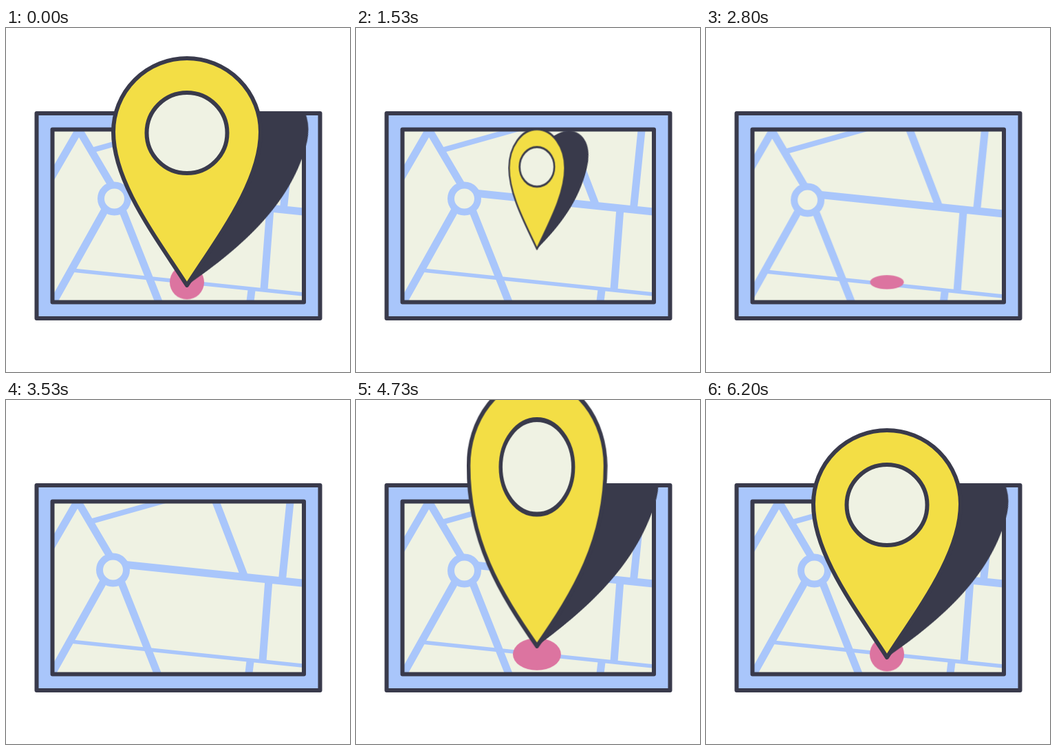
An HTML page that plays this animation: 500x500 px, repeating every 6.23 s.

```html
<!DOCTYPE html>
<html lang="en">
<head>
<meta charset="utf-8">
<title>Map pin</title>
<style>
  html, body { margin: 0; width: 100%; height: 100%; overflow: hidden; background: #fff; }
  svg { display: block; width: 100vw; height: 100vh; }

  .paper { fill: #eff2e3; }
  .line { stroke: #393a4b; stroke-width: 6; stroke-linejoin: round; }
  .roads { fill: none; stroke: #a9c6fb; stroke-width: 11; }

  /* three identical hops fill one 6230 ms loop */
  #map, #dot, #shadow, #body, #hole {
    animation: 2076.667ms ease-in-out infinite;
    transform-origin: 0 0;
  }
  #map { animation-name: pan; }
  #dot { animation-name: dot; }
  #shadow { animation-name: shadow; }
  #body {
    --slim: path("M0 0C45 -70 107 -150 107 -223A107 107 0 0 0 -107 -223C-107 -150 -45 -70 0 0Z");
    --full: path("M0 0C58 -66 107 -130 107 -223A107 107 0 0 0 -107 -223C-107 -130 -58 -66 0 0Z");
    animation-name: body, bulge;
  }
  #hole { animation-name: hole; }

  @keyframes pan {
    0%, 28.4% { transform: translate(0, 0); animation-timing-function: ease-in; }
    34.82% { transform: translate(-9.5px, 2px); animation-timing-function: cubic-bezier(.3, .5, .6, 1); }
    42.4% { transform: translate(-36px, 2px); }
    56.68% { transform: translate(12.5px, -34px); }
    69.97% { transform: translate(-2px, -1px); }
    73.6%, 100% { transform: translate(0, 0); }
  }

  @keyframes dot {
    0%, 15.65% { transform: scale(1, 1); }
    27.78% { transform: scale(1.4, .94); animation-timing-function: linear; }
    34.82% { transform: scale(1, .42); animation-timing-function: linear; }
    38%, 75.5% { transform: scale(0, 0); }
    82% { transform: scale(1.2, 1.05); }
    89% { transform: scale(.95, .97); }
    96%, 100% { transform: scale(1, 1); }
  }

  @keyframes bulge {
    0%, 15.65%, 34.3%, 76.71%, 92.45%, 100% { d: var(--slim); }
    27.78%, 80.9% { d: var(--full); }
  }

  @keyframes body {
    0%, 15.65% { transform: translateY(0) scale(1, 1); }
    21.67% { transform: translateY(0) scale(1.07, .88); }
    27.78% { transform: translateY(-16px) scale(.935, 1.18); animation-timing-function: linear; }
    31.8% { transform: translateY(-50px) scale(.42, .7); animation-timing-function: linear; }
    34.3%, 70.06% { transform: translateY(-75px) scale(0, 0); animation-timing-function: linear; }
    73.68% { transform: translateY(-53px) scale(.374, .523); animation-timing-function: linear; }
    76.71% { transform: translateY(-40px) scale(.7, .85); animation-timing-function: ease-out; }
    80.9% { transform: translateY(-8px) scale(.94, 1.13); }
    86.2% { transform: translateY(0) scale(1.05, .92); }
    92.45% { transform: translateY(0) scale(.985, 1.025); }
    98.7%, 100% { transform: translateY(0) scale(1, 1); }
  }

  @keyframes hole {
    0%, 15.65% { transform: translateY(0) scale(1, 1); }
    21.67% { transform: translateY(0) scale(1.07, .88); }
    27.78% { transform: translateY(-16px) scale(.906, 1.18); animation-timing-function: linear; }
    31.8% { transform: translateY(-53px) scale(.42, .68); animation-timing-function: linear; }
    34.3%, 70.06% { transform: translateY(-75px) scale(0, 0); animation-timing-function: linear; }
    73.68% { transform: translateY(-63.5px) scale(.427, .487); animation-timing-function: linear; }
    76.71% { transform: translateY(-45px) scale(.73, .83); animation-timing-function: ease-out; }
    80.9% { transform: translateY(-8px) scale(.94, 1.13); }
    86.2% { transform: translateY(0) scale(1.05, .92); }
    92.45% { transform: translateY(0) scale(.985, 1.025); }
    98.7%, 100% { transform: translateY(0) scale(1, 1); }
  }

  @keyframes shadow {
    0%, 15.65% { transform: translateY(0) scale(1, .89) skewX(-16.2deg); }
    21.67% { transform: translateY(0) scale(1.07, .81) skewX(-16deg); }
    27.78% { transform: translateY(-16px) scale(.935, .92) skewX(-18.9deg); animation-timing-function: linear; }
    31.8% { transform: translateY(-50px) scale(.42, .6) skewX(-20deg); animation-timing-function: linear; }
    34.3%, 70.06% { transform: translateY(-75px) scale(0, 0) skewX(-20.5deg); animation-timing-function: linear; }
    73.68% { transform: translateY(-53px) scale(.374, .515) skewX(-20.5deg); animation-timing-function: linear; }
    76.71% { transform: translateY(-40px) scale(.7, .78) skewX(-19deg); animation-timing-function: ease-out; }
    80.9% { transform: translateY(-8px) scale(.94, .93) skewX(-18deg); }
    86.2% { transform: translateY(0) scale(1.05, .83) skewX(-16deg); }
    92.45% { transform: translateY(0) scale(.985, .9) skewX(-16.4deg); }
    98.7%, 100% { transform: translateY(0) scale(1, .89) skewX(-16.2deg); }
  }
</style>
</head>
<body>
<svg viewBox="0 0 500 500">
  <defs>
    <clipPath id="sheet"><rect x="67.5" y="147.5" width="365.5" height="251"/></clipPath>
    <clipPath id="board"><rect x="41.5" y="121" width="418" height="304" rx="3"/></clipPath>
  </defs>

  <rect class="line" x="44.5" y="124" width="412" height="298" fill="#a9c6fb"/>
  <rect class="paper" x="67.5" y="147.5" width="365.5" height="251"/>

  <g clip-path="url(#sheet)">
    <g id="map" class="roads">
      <path d="M38 265L106 148L155 231M153 248L45 441M162.5 248L241 446"/>
      <path d="M157.5 238.5L490 273M294 115L348 256M418.5 115L403.5 262M384 262L375 380M357 381L351 430"/>
      <path d="M122 178.5L330 120" stroke-width="8"/>
      <path d="M96 352L490 393" stroke-width="5.5"/>
      <circle class="paper" cx="157.5" cy="248" r="19.5" stroke-width="10"/>
    </g>
  </g>
  <rect class="line" x="67.5" y="147.5" width="365.5" height="251" fill="none"/>

  <g transform="translate(263 369.5)"><circle id="dot" r="25" fill="#dc74a0"/></g>

  <g clip-path="url(#board)">
    <g transform="translate(263 374)">
      <path id="shadow" fill="#393a4b" d="M0 0C66-66 110-134 107-224A107 107 0 0 0-107-224C-107-150-45-70 0 0Z"/>
    </g>
  </g>

  <g transform="translate(263 374)" class="line">
    <path id="body" fill="#f3de45" d="M0 0C45-70 107-150 107-223A107 107 0 0 0-107-223C-107-150-45-70 0 0Z"/>
    <circle id="hole" class="paper" cy="-221.5" r="58.5"/>
  </g>
</svg>
</body>
</html>
```
